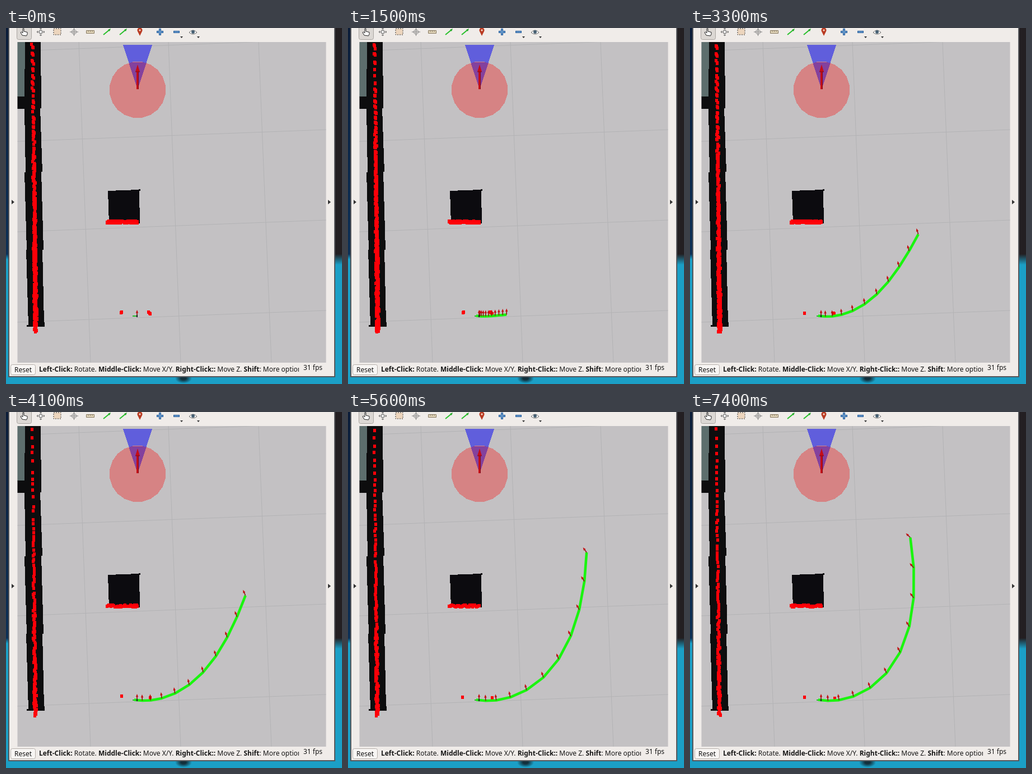
These frames come from a looping animation (600 px wide and 634 px high, 7.5 s). An HTML page with a canvas:

```html
<!DOCTYPE html>
<html>
<head>
<meta charset="utf-8">
<style>
html, body { margin: 0; width: 100%; height: 100%; overflow: hidden; background: #1b9fc6; }
svg, canvas { position: absolute; left: 0; top: 0; }
text { font: 12px "Noto Sans", "Open Sans", sans-serif; fill: #151515; }
.b { font-weight: bold; }
</style>
</head>
<body>
<svg width="600" height="634" fill="none">
  <defs>
    <linearGradient id="desk" x2="0" y2="1">
      <stop offset=".635" stop-color="#231f22"/><stop offset=".665" stop-color="#1b9fc6"/>
    </linearGradient>
    <linearGradient id="edge" x2="0" y2="1">
      <stop offset="0" stop-color="#0a1c38"/><stop offset=".635" stop-color="#0c2f55"/><stop offset=".65" stop-color="#1b9fc6"/>
    </linearGradient>
    <radialGradient id="spot"><stop offset=".3" stop-color="#12303c"/><stop offset="1" stop-color="#1b9fc6"/></radialGradient>
    <clipPath id="view"><path d="M20.500 25H571.500V596H20.500z"/></clipPath>
    <clipPath id="help"><path d="M55 597H523V621H55z"/></clipPath>
  </defs>

  <path fill="url(#desk)" d="M0 0H600V634H0z"/>
  <path fill="url(#edge)" d="M0 0H6V634H0z"/>
  <ellipse cx="317" cy="624" rx="15" ry="9" fill="url(#spot)"/>
  <path fill="#f0ece9" stroke="#55565a" stroke-width="2" d="M5-2H587V621H5z"/>

  <!-- toolbar -->
  <rect x="19.500" y="-4" width="26" height="24.500" rx="3" fill="#dcd8d4" stroke="#a9a4a0"/>
  <path fill="#fff" stroke="#222" d="M29 13L26 8l1.500-1L30 9V1h2v5l6 1.500V11l-1.500 3z"/>
  <path stroke="#666" d="M55 7H69M62 0V14M57 5l-2 2 2 2M67 5l2 2-2 2M60 12l2 2 2-2M60 2l2-2 2 2"/>
  <rect x="59.500" y="4.500" width="5" height="5" fill="#eee" stroke="#777"/>
  <rect x="85" y="1" width="13" height="11" fill="#ecd5bd" stroke="#333" stroke-dasharray="2"/>
  <circle cx="121.500" cy="7" r="4" stroke="#888"/><path stroke="#777" d="M114 7h15M121.500 0V14"/>
  <path fill="#e2d6bb" stroke="#85765d" d="M143.500 4.500h14v5h-14zM147 5v2M150.500 5v2M154 5v2"/>
  <path stroke="#29c12c" stroke-width="2" d="M174 12L185 3M203 12L214 3"/>
  <path fill="#29a52c" d="M187 1l-2 5-3-3zM216 1l-2 5-3-3z"/>
  <path fill="#b93a22" d="M239 14l-4-8a4.500 4.500 0 1 1 8 0z"/><circle cx="239" cy="4" r="1.700" fill="#f0d0c0"/>
  <path stroke="#285f9d" stroke-width="4" d="M269 7h12M275 1v12M299 7h11"/>
  <path stroke="#79a9d8" stroke-width="1.500" d="M270 7h10M275 2v10M300 7h9"/>
  <path fill="#333" d="M311 15h5l-2.500 3zM341 15h5l-2.500 3z"/>
  <path fill="#fff" stroke="#666" d="M327 8q7-8 14 0q-7 6-14 0z"/><circle cx="334" cy="7" r="3" fill="#486174"/>

  <!-- 3D view -->
  <g clip-path="url(#view)">
    <path fill="#c3c1c3" d="M20 25H572V596H20z"/>
    <path stroke="#b3b3b5" d="M130 25L151 596M290 25L312 596M451 25L474 596M20 41L572 20M20 202L572 181M20 363L572 342M20 524L572 503"/>
    <g shape-rendering="crispEdges">
      <path fill="#5d6e6d" d="M20 25H36V123H20z"/>
      <path fill="#0d0d0e" d="M34 25H62L63 143H61L65 256H63L67 395H65L68 524H69V532H37V529H40L36 395H37L33 257H35L33 144H20V122H33z"/>
      <path fill="#0c0b0f" d="M182 290L237 288V287H240V290H238L239 348H184z"/>
      <path fill="#605edc" d="M209 30H261L235 110z"/>
      <polygon id="disc" fill="#d68384"/>
      <path fill="#84419d" d="M219.500 62.500L227 60.500H243L250.500 62.500L235 110z"/>
    </g>
    <path fill="#c40d18" d="M233 109V78H231L235 65L239 78H237V109z"/>
    <path stroke="#7d0b1c" d="M236.500 78V109M231 78H239"/>
  </g>
  <path fill="#333" d="M10 306v8l5-4zM575 306v8l5-4z"/>

  <!-- status bar -->
  <rect x="8.500" y="599.500" width="44" height="18" rx="3" fill="#f8f6f4" stroke="#b5afaa"/>
  <text x="15" y="613">Reset</text>
  <g clip-path="url(#help)"><text x="59" y="612"><tspan class="b">Left-Click:</tspan> Rotate. <tspan class="b">Middle-Click:</tspan> Move X/Y. <tspan class="b">Right-Click::</tspan> Move Z. <tspan class="b">Shift</tspan>: More options</text></g>
  <text x="531" y="609">31 fps</text>
</svg>
<canvas id="stage" width="600" height="634"></canvas>

<script>
const ctx = document.getElementById('stage').getContext('2d');
const LOOP = 7500, STEP = 100, ROBOT = { x: 235, y: 510 }, SEGMENTS = 10;
const { PI, sin, cos } = Math;
const radians = degrees => degrees * PI / 180;
const mix = (a, b, u) => a + (b - a) * u;

document.getElementById('disc').setAttribute('points', Array.from({ length: 20 }, (_, i) => {
  const a = (i + 0.5) * PI / 10;
  return [235 + 50.5 * cos(a), 110 + 50.5 * sin(a)];
}).join(' '));

// Planned drive: top speed per segment, total bend, how early it bends, final arrow turn.
const plans = [
  { time: 900, speed: 1.6, bend: 0, early: 0.3, turn: 0 },
  { time: 2300, speed: 14.1, bend: 26, early: 0.3, turn: 0 },
  { time: 3300, speed: 34, bend: 67, early: 0.1, turn: -18 },
  { time: 4000, speed: 39, bend: 72, early: 0.08, turn: -22 },
  { time: 4600, speed: 50.5, bend: 86, early: 0.04, turn: -31 },
  { time: 5400, speed: 51, bend: 88, early: 0.04, turn: -33 },
  { time: 6200, speed: 54.2, bend: 102.5, early: 0.04, turn: -46 }
];

function planAt(time) {
  const next = plans.findIndex(p => p.time > time);
  if (next < 1) return plans.at(next);
  const from = plans[next - 1], to = plans[next];
  const u = (time - from.time) / (to.time - from.time);
  return Object.fromEntries(Object.keys(from).map(key => [key, mix(from[key], to[key], u)]));
}

// Speeds up from the start pose while the heading swings left.
function posesOf({ speed, bend, early }) {
  let x = 234, y = 513;
  const poses = [[x, y]];
  for (let i = 0; i < SEGMENTS; i++) {
    const u = i / (SEGMENTS - 1);
    const length = speed * mix(0.23, 1, sin(u * PI / 2));
    const heading = radians(bend * (u - 0.05 * sin(2 * PI * u) + early * sin(PI * u)) - 6);
    x += length * cos(heading);
    y -= length * sin(heading);
    poses.push([x, y]);
  }
  return poses;
}

function randomFrom(seed) {
  return () => {
    seed = seed + 0x6D2B79F5 | 0;
    let h = Math.imul(seed ^ seed >>> 15, 1 | seed);
    h = h + Math.imul(h ^ h >>> 7, 61 | h) ^ h;
    return ((h ^ h >>> 14) >>> 0) / 4294967296;
  };
}

function drawArrow(x, y, degrees) {
  ctx.save();
  ctx.translate(x, y);
  ctx.rotate(radians(degrees));
  ctx.fillStyle = '#8c1512';
  ctx.fillRect(-0.8, -7, 1.6, 7);
  ctx.fillStyle = '#c40c10';
  ctx.beginPath();
  ctx.moveTo(-2.2, -5.5);
  ctx.lineTo(0, -11);
  ctx.lineTo(2.2, -5.5);
  ctx.fill();
  ctx.restore();
}

function drawPath(time) {
  ctx.fillStyle = '#25b82a';
  ctx.fillRect(226, 512, 8, 2);
  if (time >= 400) {
    const plan = planAt(time), poses = posesOf(plan);
    ctx.strokeStyle = '#1af50f';
    ctx.lineWidth = 4.6;
    ctx.lineJoin = 'round';
    ctx.beginPath();
    ctx.moveTo(229, 512.5);
    poses.forEach(([x, y]) => ctx.lineTo(x, y));
    ctx.stroke();
    poses.forEach(([x, y], i) => drawArrow(x, y, plan.turn * i / SEGMENTS));
  } else drawArrow(234, 513, 0);
  ctx.fillStyle = '#1b2025';
  ctx.fillRect(233, 511, 2, 4);
}

function drawScan(frame) {
  ctx.fillStyle = '#ff0008';
  const dot = (x, y) => ctx.fillRect(Math.round(x - 2.5), Math.round(y - 3), 5, 6);
  const layers = (frame + 3) % 9 < 4 ? 3 : 1; // sweeps pile up, then clear
  for (let s = 0; s < layers; s++) {
    const random = randomFrom(frame * 7 + s);
    const noise = size => (random() * 2 - 1) * size;
    // rays hitting the wall
    for (let a = -0.163; a < 1.205; a += 0.0105) {
      const angle = a - s * 0.0012, reach = 185 / cos(angle) + noise(2.3);
      const y = ROBOT.y - reach * sin(angle);
      if (random() > 0.03) dot(ROBOT.x - reach * cos(angle) + (y - 510) * 0.011 + 2 + s * 0.7, y);
    }
    // rays hitting the box
    for (let x = 180.5; x < 236; x += 1.7) dot(x, 345.5 + noise(1.8));
    // two thin posts beside the robot
    const left = noise(1.5), right = noise(2.2);
    dot(205.5 - left, 507 + left);
    dot(256.5 + right, 508 + right);
  }
}

function render(now) {
  let frame = Math.floor(now % LOOP / STEP);
  if ([11, 24, 46].includes(frame)) frame--; // pauses
  ctx.clearRect(0, 0, 600, 634);
  drawScan(frame);
  drawPath(frame * STEP);
}

const start = performance.now();
(function tick() {
  render(performance.now() - start);
  requestAnimationFrame(tick);
})();
</script>
</body>
</html>
```
